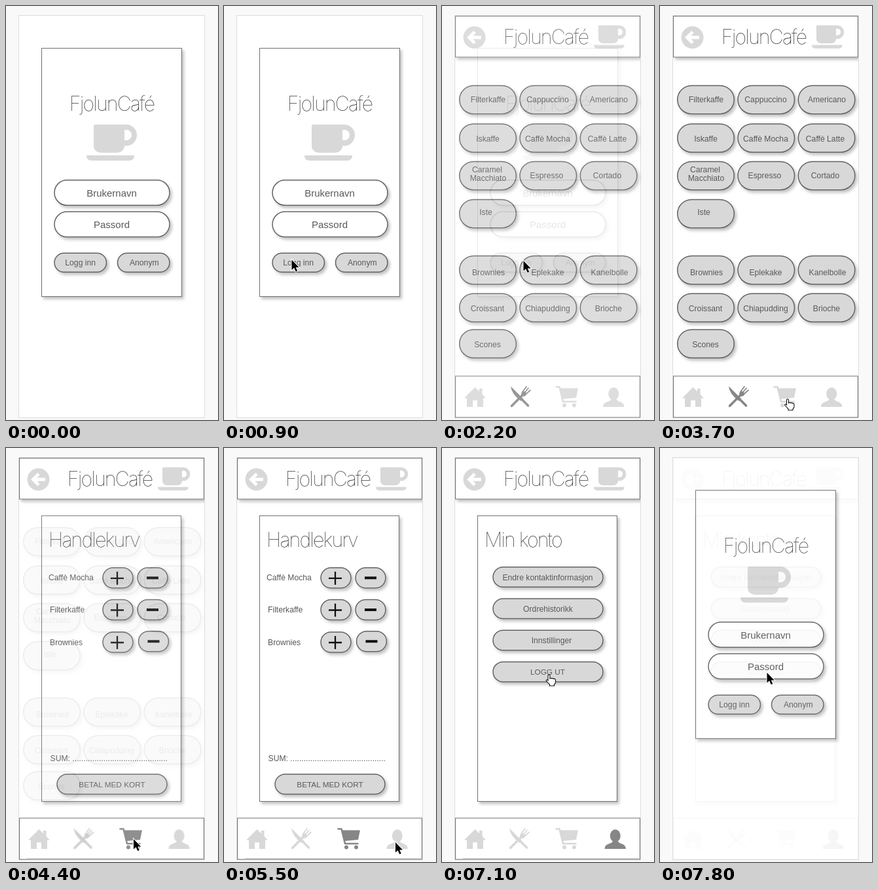
An HTML page for the animation above (8000 ms loop, 324x632 px).

```html
<!DOCTYPE html>
<html lang="no">
<head>
<meta charset="utf-8">
<title>Kaféprototype</title>
<style>
  html, body { margin: 0; width: 100%; height: 100%; overflow: hidden; background: #f9f9f9; }
  svg { display: block; width: 324px; height: 632px; }
  text { font: 12.2px "Liberation Sans", Arial, sans-serif; fill: #595959; text-anchor: middle; }
  .left { text-anchor: start; }
  .field { font-size: 15px; }
  .caps { font-size: 11.8px; }
  .title { font: 100 30.5px Inter, Roboto, sans-serif; letter-spacing: -1.9px; fill: #222; }
  .pill { stroke: #636363; stroke-width: 1.5; filter: url(#shadow); }
  .panel { fill: #fff; stroke: #707070; filter: url(#shadow); }
  .icon { fill: #d8d8d8; stroke: #d8d8d8; stroke-width: 0; }
  .active { fill: #868686; stroke: #868686; }
</style>
</head>
<body>
<svg viewBox="0 0 324 632">
  <defs id="defs"></defs>
  <use id="current"/>
  <use id="previous"/>
  <path id="arrow" d="M0 0V15.5L3.6 12.3 6.2 18 8.8 16.9 6.3 11.4H11.2Z"
        fill="#000" stroke="#fff" stroke-width="2" paint-order="stroke"/>
  <path id="hand" d="M-1.5 12V4.5a1.5 1.5 0 0 1 3 0V9q1.5-1.5 3 0 1.5-1 3 .5 2-.5 2.5 1.5V14Q10 17 8 18V20H1V18Q-2 15-4.5 12-3.5 9.5-1.5 12Z"
        fill="#fff" stroke="#111" stroke-width="1.1"/>
</svg>
<script>
const GREY = '#d8d8d8';
const BRAND = 'FjolunCafé';
const $ = id => document.getElementById(id);

const text = (x, y, label, style = '') => `<text x="${x}" y="${y}" class="${style}">${label}</text>`;
const pill = (x, y, w, h, fill = GREY) =>
  `<rect class="pill" x="${x}" y="${y}" width="${w}" height="${h}" rx="${h / 2}" fill="${fill}"/>`;
const panel = (x, y, w, h) => `<rect class="panel" x="${x}" y="${y}" width="${w}" height="${h}"/>`;
const cup = (x, y, scale) => `<path class="icon" fill-rule="evenodd"
  transform="translate(${x} ${y}) scale(${scale})"
  d="M13 0H61A16 16.25 0 0 1 61 32.5H58A11 10.5 0 0 1 47 43H22A11 10.5 0 0 1 11 32.5V2Q11 0 13 0Z
     M58 8V24H61A8 8 0 0 0 61 8ZM0 47H73Q73 55 65 55H8Q0 55 0 47Z"/>`;

const background = '<rect x="19.5" y="14.5" width="284" height="614" fill="#fff" stroke="#dcdcdc"/>';

const icons = {
  home: '<path d="M50.5 582L57 588.5V584H61.5V593L67 598.5H63V612H54V602H47V612H38V598.5H34Z"/>',
  food: `<path d="M105 580.5L124 599.5 120.5 603Q106 592 105 580.5Z"/><circle cx="125" cy="592" r="3.8"/>
    <path fill="none" stroke-width="3.6" stroke-linecap="round" d="M106.5 610.5L124 593M121.5 600L131.5 610"/>
    <path fill="none" stroke-width="1.7" stroke-linecap="round" d="M129 581l-6 8M132 583.5l-7 8M135 586.5l-8 7"/>`,
  cart: `<path d="M180 583.5H208L205 598 184 600Z"/><circle cx="187" cy="609.5" r="3"/><circle cx="202" cy="609.5" r="3"/>
    <path fill="none" stroke-width="2.6" stroke-linejoin="round" d="M173.5 581.5H179.5L185 604H205.5"/>`,
  person: `<ellipse cx="262.3" cy="592" rx="8" ry="9.7"/>
    <path d="M246 612Q246 606 253 604 259 602.5 259 598H266Q266 602.5 271.5 604 278.5 606 278.5 612Z"/>`
};

function chrome(active, shifts = {}) {
  const nav = Object.entries(icons).map(([name, shape]) =>
    `<g class="icon ${name === active ? 'active' : ''}" transform="translate(${shifts[name] || 0} 0)">${shape}</g>`);
  return `<g clip-path="url(#phone)">${panel(20.5, 15.5, 282, 62.5)}</g>
    <circle class="icon" cx="49.5" cy="48" r="17"/>
    <path d="M50 39.5L41.5 48 50 56.5M42 48H60" fill="none" stroke="#fff" stroke-width="4.8"/>
    ${text(158.5, 58, BRAND, 'title')}${cup(232, 29.5, .64)}
    <rect x="20.5" y="565" width="282" height="63" fill="#fff" stroke="#707070"/>${nav.join('')}`;
}

const login = background + panel(54.5, 64.5, 214, 379) +
  text(161.5, 160, BRAND, 'title') + cup(123, 181, 1) +
  pill(74, 265.7, 176, 38.6, '#fff') + text(161.5, 290.5, 'Brukernavn', 'field') +
  pill(74, 314, 176, 38.6, '#fff') + text(161.5, 339, 'Passord', 'field') +
  pill(74, 377.3, 79.5, 29) + text(113.7, 396.3, 'Logg inn') +
  pill(170.5, 377.3, 79.5, 29) + text(211.3, 396.3, 'Anonym');

// Each row: pill top, baseline, then label and label centre per column.
const menuRows = [
  [121.5, 147, ['Filterkaffe', 70.5], ['Cappuccino', 161.5], ['Americano', 255]],
  [180, 206.5, ['Iskaffe', 70], ['Caffè Mocha', 161.5], ['Caffè Latte', 252.5]],
  [237.5, 263, ['Caramel', 69], ['Espresso', 160], ['Cortado', 252.5]],
  [295.5, 319, ['Iste', 67]],
  [381.5, 411, ['Brownies', 71], ['Eplekake', 161.5], ['Kanelbolle', 256]],
  [439, 465.5, ['Croissant', 69.5], ['Chiapudding', 161.5], ['Brioche', 254.5]],
  [494, 521, ['Scones', 69.5]]
];
const menu = background + menuRows.map(([top, baseline, ...items]) =>
  items.map(([label, x], column) => pill(26.7 + column * 92.3, top, 86.6, 43.2) +
    (label === 'Caramel'
      ? text(x, baseline - 9, label) + text(70.5, baseline + 4, 'Macchiato')
      : text(x, baseline, label))).join('')).join('') + chrome('food');

const card = title => background + panel(54.5, 103.5, 213, 436) + text(65, 151, title, 'title left');
const shifted = { food: -2, person: 2.5 };
const underline = '<path d="M32 626.5H301" stroke="#ccc"/>';

const cartRow = (label, x, baseline, y, minusX, minusY) => text(x, baseline, label, 'left') +
  pill(148, y, 46, 31) + pill(minusX, minusY, 46, 31) +
  `<path d="M160 ${y + 16}h20m-10-10v20" stroke="#111" stroke-width="2.3"/>
   <path d="M${minusX + 14} ${minusY + 15.5}h18" stroke="#111" stroke-width="4"/>`;

const cart = card('Handlekurv') +
  cartRow('Caffè Mocha', 65, 201.5, 182.8, 201, 182.8) +
  cartRow('Filterkaffe', 67, 251, 231.5, 201, 231.5) +
  cartRow('Brownies', 67, 301, 281, 202.5, 279.7) +
  text(67.5, 478, 'SUM: ' + '.'.repeat(43), 'left') +
  pill(78, 498, 168, 30.5) + text(162, 517.7, 'BETAL MED KORT', 'caps') +
  chrome('cart', shifted) + underline;

const account = card('Min konto') + [
  ['Endre kontaktinformasjon', 161.5], ['Ordrehistorikk', 162], ['Innstillinger', 167.5], ['LOGG UT', 161.5, 'caps']
].map(([label, x, style], i) =>
  pill(78, 181.8 + i * 48.2, 168, 30.5) + text(x, 201.7 + i * 48.2, label, style)).join('') +
  chrome('person', shifted) + underline;

$('defs').innerHTML = `
  <filter id="shadow" x="-20%" y="-30%" width="140%" height="180%">
    <feDropShadow dx="3" dy="3.5" stdDeviation="2" flood-color="#000" flood-opacity=".24"/>
  </filter>
  <clipPath id="phone"><rect x="20" y="15" width="283" height="613"/></clipPath>` +
  Object.entries({ login, menu, cart, account })
    .map(([name, shapes]) => `<g id="${name}">${shapes}</g>`).join('');

const LOOP = 8000, STEP = 100, FADE = 350;

// The hand shows from hover until the click; the dissolve begins shortly before the next step.
const clicks = [
  { hover: 1700, at: 2100, lead: 70, from: 'login', to: 'menu' },
  { hover: 3700, at: 4300, lead: 80, from: 'menu', to: 'cart' },
  { hover: 5600, at: 6000, lead: 50, from: 'cart', to: 'account' },
  { hover: 7100, at: 7600, lead: 10, from: 'account', to: 'login' }
];

const path = [
  [400, 239, 436], [500, 196, 421], [700, 130, 397], [900, 103.5, 387.5],
  [1600, 114, 388], [1700, 124.5, 389], [2900, 124.5, 389],
  [3000, 160, 178], [3200, 214, 580], [3300, 214, 580],
  [3500, 275, 608], [3600, 235, 604], [3700, 195, 597], [5100, 195, 597],
  [5300, 232, 608], [5500, 262, 602], [5600, 266.5, 595], [6300, 266.5, 595],
  [6500, 215, 440], [6700, 140, 215], [6800, 129, 211], [7000, 150, 320], [7100, 163.5, 343]
];

function cursorAt(t) {
  const next = path.findIndex(key => key[0] > t);
  if (next < 0) return path.at(-1).slice(1);
  const [t0, x0, y0] = path[next - 1], [t1, x1, y1] = path[next];
  const u = (t - t0) / (t1 - t0);
  return [x0 + (x1 - x0) * u, y0 + (y1 - y0) * u];
}

function render(now) {
  const t = Math.floor(now % LOOP / STEP) * STEP;
  const click = clicks.findLast(c => c.at <= t);
  const u = click ? Math.min(1, (t - click.at + click.lead) / FADE) : 1;
  $('current').setAttribute('href', '#' + (click ? click.to : 'login'));
  $('previous').setAttribute('href', '#' + (click ? click.from : 'login'));
  $('previous').setAttribute('opacity', (1 - u) ** 3);

  const visible = t >= path[0][0];
  const hovering = clicks.some(c => t >= c.hover && t < c.at);
  $('arrow').style.display = visible && !hovering ? '' : 'none';
  $('hand').style.display = visible && hovering ? '' : 'none';
  if (visible) {
    const move = `translate(${cursorAt(t).join(' ')})`;
    $('arrow').setAttribute('transform', move);
    $('hand').setAttribute('transform', move);
  }
}

const start = performance.now();
(function tick() {
  render(performance.now() - start);
  requestAnimationFrame(tick);
})();
</script>
</body>
</html>
```
